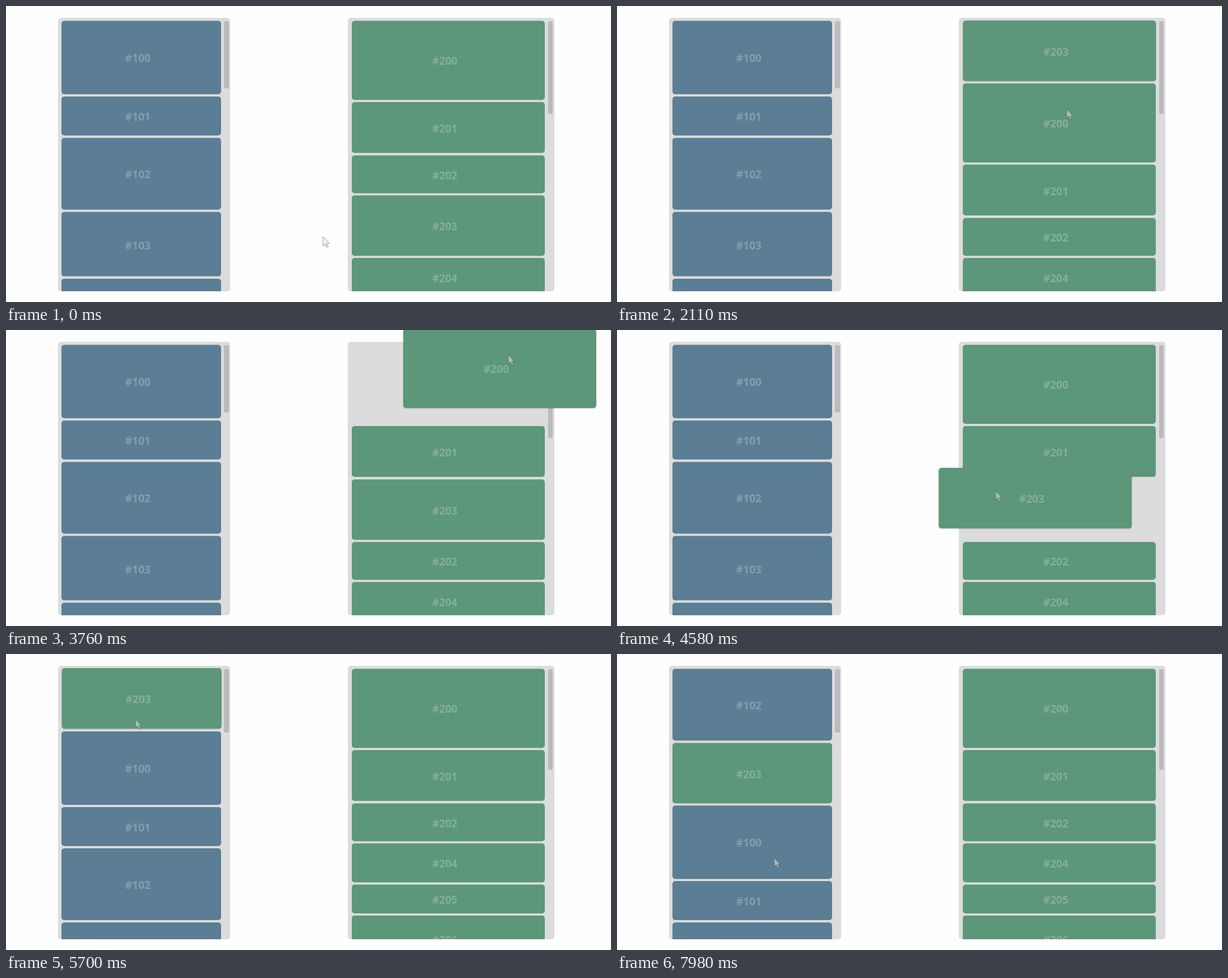
Animation of 1069 by 524 pixels, one loop 8 s. Source, as an HTML page:

```html
<!DOCTYPE html>
<html lang="en">
<head>
<meta charset="utf-8">
<title>Drag between lists</title>
<style>
  html, body { margin: 0; width: 100%; height: 100%; overflow: hidden; background: #fefefe; }
  #stage { position: absolute; left: 0; top: 0; width: 1069px; height: 524px; overflow: hidden; background: #fefefe; }
  #stage > * { position: absolute; box-sizing: border-box; }
  .list { top: 21px; height: 484px; border-radius: 5px; background: #dcdcdc; }
  .bar { top: 26.5px; width: 8.5px; border-radius: 2.5px; background: #bababc; }
  .item {
    left: 0; top: 0; z-index: 1; padding: 5px 12px 0 0; border-radius: 5px;
    display: flex; align-items: center; justify-content: center;
    font: 700 19px/1.36 "Open Sans", "Noto Sans", sans-serif;
    color: rgba(221, 221, 221, .33);
  }
  .blue { background: #5b7e95; }
  .green { background: #5b9778; }
  .item.lifted { z-index: 3; box-shadow: 0 1px 2px rgba(0, 0, 0, .25); }
  #floor { left: 0; top: 505px; width: 100%; height: 19px; z-index: 2; background: #fefefe; }
  #cursor { left: 0; top: 0; z-index: 4; overflow: visible; }
</style>
</head>
<body>
<div id="stage">
  <div class="list" style="left:92px;width:304px"></div>
  <div class="list" style="left:604px;width:365px"></div>
  <div class="bar" style="left:385px"></div>
  <div class="bar" style="left:957.5px"></div>
  <div id="floor"></div>
  <svg id="cursor" width="13" height="21">
    <path d="M.6 .6V16.6L4.3 13.2L6.8 19L9.6 17.8L7.1 12.2H11.6Z"
      fill="rgba(238,238,238,.5)" stroke="rgba(60,60,60,.42)" stroke-width="1.1" stroke-linejoin="round"/>
  </svg>
</div>
<script>
const LOOP = 8000, TOP = 26.3, GAP = 4.1, VIEW = 473;
const SHIFT = 210, SETTLE = 300; // ms for neighbours and for a released item
const REACH = 115;               // sideways distance at which a list reacts
const DROP = [8, -14];           // release point relative to the first slot

// `rest` is the height of the content further down
const LISTS = [{ x: 98, w: 282, rest: 1321 }, { x: 611, w: 340.6, rest: 730 }];
const HEIGHT = {
  100: 129.8, 101: 69.1, 102: 127.1, 103: 114, 104: 90,
  200: 139.7, 201: 90.3, 202: 66.7, 203: 106.6, 204: 68.8, 205: 50.7, 206: 82
};

// before and via: pointer time, x, y; hold: grip inside the item
const DRAGS = [
  { id: 203, grab: 1090, drop: 1900, hold: [197, 38], wait: 0,
    before: [[310, 565, 417], [600, 680, 490], [930, 795, 400], [1050, 795, 400]],
    via: [[1430, 888, 246], [1720, 840, 32]] },
  { id: 201, grab: 2490, drop: 3010, hold: [168, 54], wait: 120,
    before: [], via: [[2700, 872, 100], [2930, 845, 37]] },
  { id: 200, grab: 3370, drop: 3900, hold: [185, 45], wait: 30,
    before: [], via: [[3560, 897, 95], [3760, 887, 43]] },
  { id: 203, grab: 4460, drop: 5520, hold: [100, 40], wait: 0,
    before: [[4130, 774, 274], [4230, 750, 354], [4380, 750, 354]],
    via: [[4850, 580, 250], [5240, 386, 108]] },
  { id: 102, grab: 6890, drop: 7470, hold: [164, 29], wait: 380,
    before: [[5960, 266, 256]], via: [[7180, 352, 100]] }
];

const mix = (a, b, p) => a + (b - a) * p;

// quick start, soft landing
const ease = v => 1 - (1 - Math.max(0, Math.min(1, v))) ** 2.6;

// monotone cubic through the pointer path
const path = [[0, 559.5, 408], [50, 559.5, 408], [200, 565, 417]];
const slope = (i, k) => (path[i + 1][k] - path[i][k]) / (path[i + 1][0] - path[i][0]);
function tangent(i, k) {
  if (i === 0 || i === path.length - 1) return 0;
  const a = slope(i - 1, k), b = slope(i, k);
  return a * b > 0 ? 2 * a * b / (a + b) : 0;
}
function pointer(t) {
  let i = 0;
  while (i < path.length - 2 && path[i + 1][0] <= t) i++;
  const p = path[i], q = path[i + 1], d = q[0] - p[0], u = (t - p[0]) / d;
  return [1, 2].map(k =>
    mix(p[k], q[k], u * u * (3 - 2 * u)) +
    d * u * (1 - u) * ((1 - u) * tangent(i, k) - u * tangent(i + 1, k)));
}

function stack(orders) {
  const tops = {};
  for (const order of orders) {
    let y = TOP;
    for (const id of order) { tops[id] = y; y += HEIGHT[id] + GAP; }
  }
  return tops;
}

const ids = Object.keys(HEIGHT).map(Number);
const orders = [ids.filter(id => id < 200), ids.filter(id => id >= 200)];
const layouts = [];
const record = time => layouts.push({ time, tops: stack(orders), orders: orders.map(o => [...o]) });
record(0);

// puts a carried item where it hovers; true if an order changed
function hover(id, x, y) {
  const near = LISTS.findIndex(list => Math.abs(x - list.x) < REACH);
  if (near < 0) return false;
  const order = orders[near], other = orders[1 - near];
  let changed = false;
  if (!order.includes(id)) {
    other.splice(other.indexOf(id), 1);
    order.push(id);
    changed = true;
  }
  const tops = stack(orders);
  let i = order.indexOf(id);
  while (i > 0 && y < tops[order[i - 1]] + .4 * HEIGHT[order[i - 1]]) {
    [order[i - 1], order[i]] = [order[i], order[i - 1]];
    i--;
    changed = true;
  }
  return changed;
}

// build the pointer path and every rearrangement, drag by drag
for (const { id, grab, drop, hold: [dx, dy], wait, before, via } of DRAGS) {
  const from = LISTS[orders.findIndex(o => o.includes(id))];
  const spot = [from.x + dx, stack(orders)[id] + dy];
  path.push(...before);
  if (wait) path.push([grab - wait, ...spot]);
  const last = via[via.length - 1];
  const goal = LISTS.find(list => list.x < last[1] - dx + REACH && list.x > last[1] - dx - 200);
  path.push([grab, ...spot], ...via, [drop, goal.x + dx + DROP[0], TOP + dy + DROP[1]]);
  for (let t = grab; t < drop; t += 10) {
    const [px, py] = pointer(t);
    if (hover(id, px - dx, py - dy)) record(t);
  }
}
path.push([7960, 277, 360], [LOOP, 277, 360]);

function slotY(id, t, k = layouts.length - 1) {
  const { time, tops } = layouts[k];
  if (k === 0) return tops[id];
  if (t <= time || tops[id] === layouts[k - 1].tops[id]) return slotY(id, t, k - 1);
  return mix(slotY(id, time, k - 1), tops[id], ease((t - time) / SHIFT));
}

const stage = document.getElementById("stage");
const cursor = document.getElementById("cursor");
const bars = document.querySelectorAll(".bar");
const items = ids.map(id => {
  const el = document.createElement("div");
  el.className = "item " + (id < 200 ? "blue" : "green");
  el.textContent = "#" + id;
  el.style.height = HEIGHT[id] + "px";
  stage.append(el);
  return { id, el };
});

const place = (el, x, y) => { el.style.transform = `translate(${x.toFixed(2)}px, ${y.toFixed(2)}px)`; };

function drawItem({ id, el }, t, now) {
  const home = LISTS[now.orders.findIndex(o => o.includes(id))];
  let { x, w } = home, y = slotY(id, t);
  const drag = DRAGS.find(d => d.id === id && t >= d.grab && t < d.drop + SETTLE);
  if (drag) {
    const [px, py] = pointer(Math.min(t, drag.drop));
    const p = ease((t - drag.drop) / SETTLE);
    x = mix(px - drag.hold[0], x, p);
    y = mix(py - drag.hold[1], y, p);
    // the width adapts to a new list only on release
    if (t < drag.drop) w = LISTS[id < 200 ? 0 : 1].w;
  }
  el.classList.toggle("lifted", !!drag);
  el.style.width = w + "px";
  place(el, x, y);
}

const start = performance.now();
function draw() {
  const t = (performance.now() - start) % LOOP;
  const now = layouts.filter(l => l.time <= t).pop();
  items.forEach(item => drawItem(item, t, now));
  LISTS.forEach((list, i) => {
    const content = now.orders[i].reduce((sum, id) => sum + HEIGHT[id] + GAP, list.rest);
    bars[i].style.height = VIEW * VIEW / content + "px";
  });
  place(cursor, ...pointer(t));
  requestAnimationFrame(draw);
}
draw();
</script>
</body>
</html>
```
